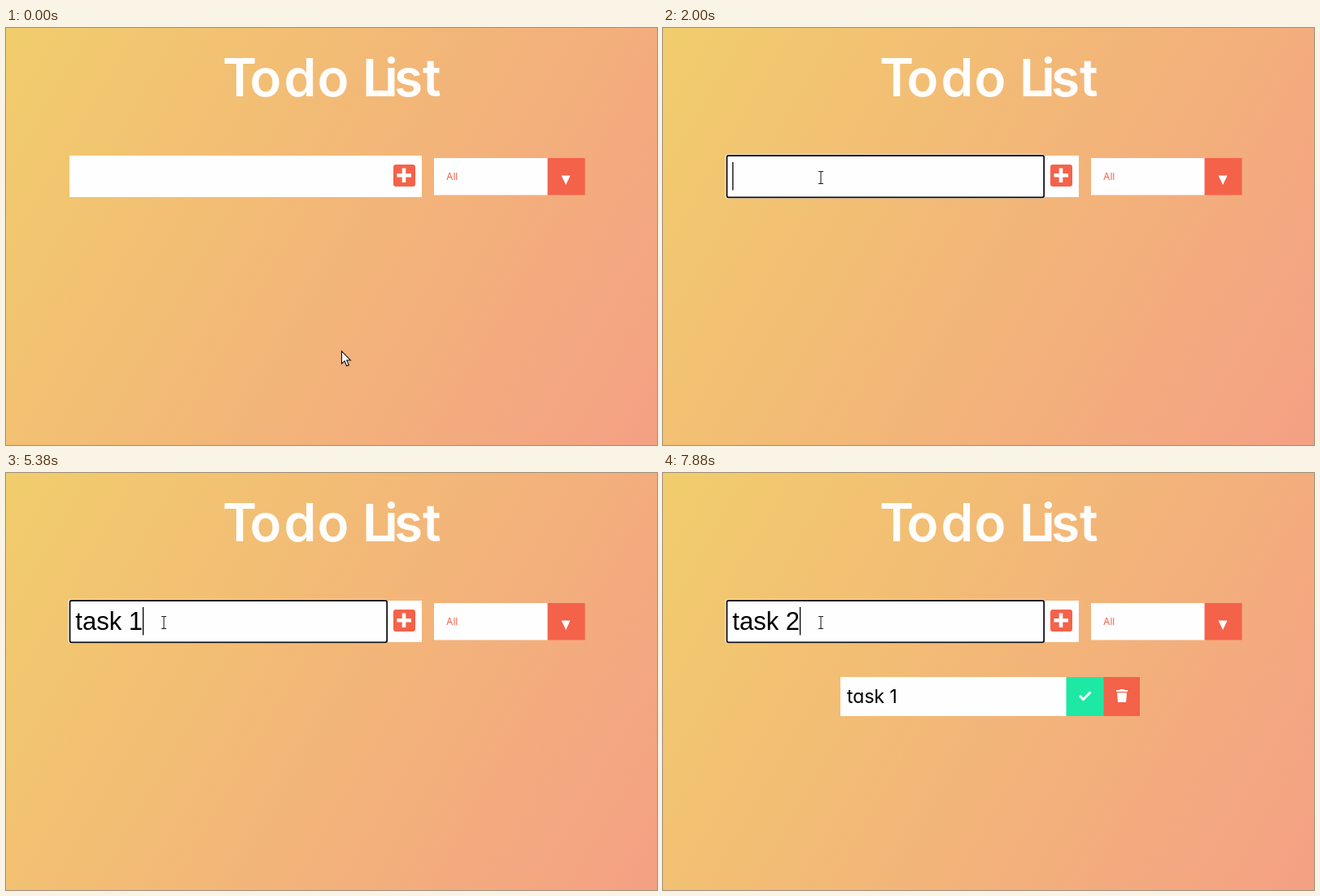
Animation of 800 by 513 pixels, one loop 8000 ms. Source, as an HTML page:

```html
<!DOCTYPE html>
<html lang="en">
<head>
<meta charset="utf-8">
<title>Todo List</title>
<style>
  html, body { margin: 0; width: 100%; height: 100%; overflow: hidden; }
  body { background: linear-gradient(120deg, #f1cd6c, #f4a084); }
  svg { display: block; width: 100%; height: 100%; }
  text { white-space: pre; }
  .title { font: 600 64px Inter, sans-serif; fill: #fffefc; }
  .narrow { font: 700 64px Lato, sans-serif; }
  .label { font: 400 12.2px Inter, sans-serif; fill: #f4624a; }
  .task { font: 400 23px Inter, sans-serif; font-feature-settings: "cv11"; }
  .typed { font: 31px "Liberation Sans", Arial, sans-serif; }
  .red { fill: #f4624a; }
  .white { fill: #fffeff; }
  .green { fill: #1de9a4; }
</style>
</head>
<body>
<svg viewBox="0 0 800 513">
  <text class="title" y="84" x="266 299.500 341.500 382.500 421 437.500 465 477 512">Todo <tspan class="narrow">L</tspan>ist</text>

  <rect class="white" x="78" y="157" width="433" height="51"/>
  <rect class="red" x="476" y="168" width="27" height="27" rx="3"/>
  <path d="M489 172.5v17.5M480.5 181.2h17.5" stroke="#fff" stroke-width="4.6"/>

  <rect class="white" x="526" y="160" width="140" height="45.5"/>
  <rect class="red" x="665.5" y="160" width="46" height="45.5"/>
  <text class="label" x="541" y="187">All</text>
  <path class="white" d="M682.5 181.5h11l-5.5 11.5z"/>

  <g id="focus">
    <rect class="white" x="76.5" y="155.5" width="393" height="54" rx="3"/>
    <rect x="78.5" y="157" width="389.700" height="51.3" rx="2" fill="#fffeff" stroke="#0c0c10" stroke-width="1.8"/>
  </g>
  <text id="typed" class="typed" x="85.3" y="193"></text>
  <rect id="caret" y="165" width="1.3" height="34.5"/>

  <g id="item">
    <rect class="white" x="218" y="251" width="278" height="48"/>
    <rect class="green" x="495.5" y="251" width="46.5" height="48"/>
    <rect class="red" x="541.5" y="251" width="44.5" height="48"/>
    <text class="task" x="226" y="283">task 1</text>
    <path d="M512 274l4.5 4.5 9-9" fill="none" stroke="#fff" stroke-width="3"/>
    <path class="white" d="M557 267h4l1-1h4l1 1h4v2h-14zM558 270.2h12l-.8 10.3q-.1 1.5-1.6 1.5h-7.2q-1.5 0-1.6-1.5z"/>
  </g>

  <path id="arrow" d="M.5.5v15.5l3.6-3.3 2.6 6 2.6-1.1-2.6-5.9h4.6z" fill="#fff" stroke="#111" stroke-width="1.1"/>
  <path id="beam" d="M-3-7.5h2.3l.7.7.7-.7h2.3M0-7v14M-3 7.5h2.3l.7-.7.7.7h2.3" fill="none" stroke="#222" stroke-width="1.1"/>
</svg>
<script>
const LOOP = 8000;
const [focusRing, typed, caret, item, arrow, beam] =
  ["focus", "typed", "caret", "item", "arrow", "beam"].map(id => document.getElementById(id));

// [time, x, y]
const pointer = [
  [0, 412, 397], [130, 421, 400], [250, 430, 388], [380, 400, 300],
  [500, 340, 190], [630, 265, 90], [750, 205, 47], [880, 174, 58],
  [1000, 178, 125], [1130, 190, 174.5], [1250, 193, 181], [1380, 194, 184]
];
const typing = [
  [0, ""], [2880, "t"], [3130, "ta"], [3380, "tas"], [3630, "task"],
  [3880, "task "], [4250, "task 1"], [5630, ""], [6630, "t"], [6750, "ta"],
  [7000, "tas"], [7250, "task"], [7500, "task "], [7880, "task 2"]
];
const blinking = [
  [0, false], [1880, true], [2500, false], [2880, true],
  [4880, false], [5380, true], [5880, false], [6500, true]
];

const pen = document.createElement("canvas").getContext("2d");
pen.font = '31px "Liberation Sans", Arial, sans-serif';

const current = (steps, t) => steps.findLast(step => step[0] <= t);
const show = (el, visible) => el.setAttribute("visibility", visible ? "visible" : "hidden");

function draw(t) {
  const [, x, y] = current(pointer, t);
  const [, text] = current(typing, t);
  const overInput = t >= 1130;

  show(arrow, !overInput);
  show(beam, overInput);
  (overInput ? beam : arrow).setAttribute("transform", `translate(${x} ${y})`);

  show(focusRing, t >= 1880);
  show(item, t >= 5630);
  show(caret, current(blinking, t)[1]);
  typed.textContent = text;
  caret.setAttribute("x", 85.2 + pen.measureText(text).width);
}

function tick() {
  draw(performance.now() % LOOP);
  requestAnimationFrame(tick);
}
tick();
</script>
</body>
</html>
```
